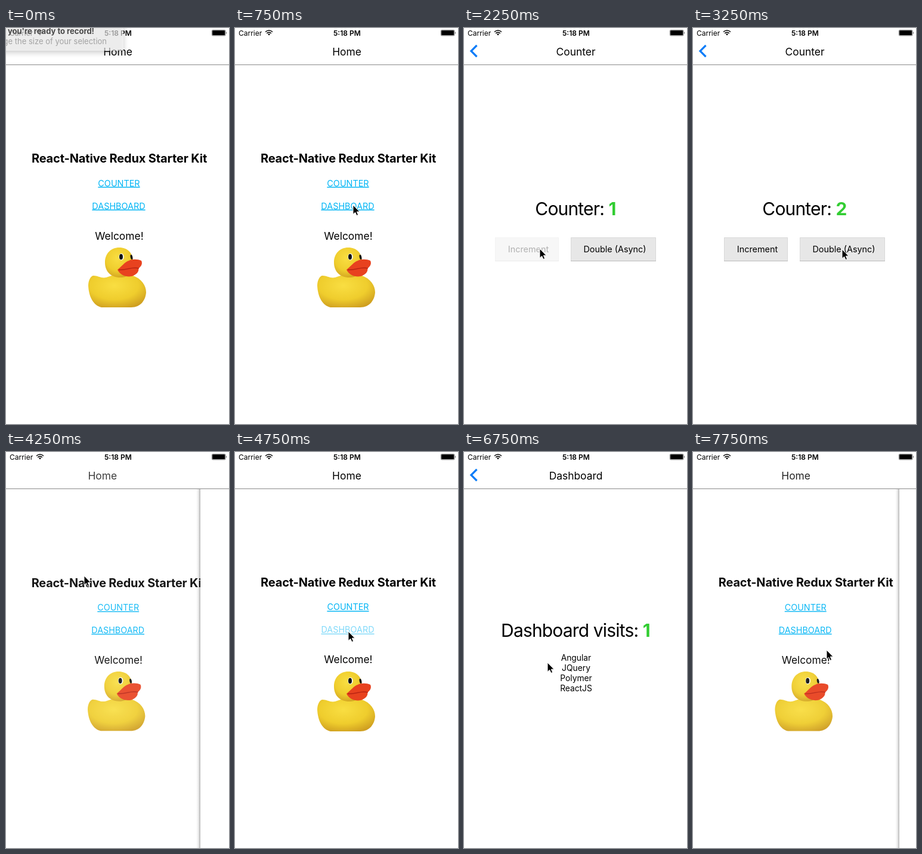
These frames come from a looping animation (374 by 662 pixels, 8 s). An HTML page:

```html
<!DOCTYPE html>
<html lang="en">
<head>
<meta charset="utf-8">
<title>Starter kit navigation</title>
<style>
  html, body { margin: 0; width: 100%; height: 100%; overflow: hidden; background: #fff; }
  svg { display: block; width: 100vw; height: 100vh; }
  text { font-family: Inter, "Liberation Sans", sans-serif; font-optical-sizing: none; text-anchor: middle; }
  .title { font-size: 17.4px; }
  .link { font-size: 14.4px; fill: #00b5f5; text-decoration: underline; }
  .big { font-size: 30px; letter-spacing: -.028em; }
  .big tspan { font-weight: 700; fill: #32cd32; }
  .button { font-size: 14.4px; }
  .list { font-size: 13.8px; }
  .status { font-size: 12px; text-anchor: start; }
</style>
</head>
<body>
<svg viewBox="0 0 374 662" preserveAspectRatio="none">
  <defs>
    <linearGradient id="edge">
      <stop offset="0" stop-opacity="0"/>
      <stop offset=".5" stop-opacity=".07"/>
      <stop offset="1" stop-opacity=".3"/>
    </linearGradient>
    <radialGradient id="yellow" cx=".45" cy=".35" r=".7">
      <stop offset="0" stop-color="#f9de42"/>
      <stop offset=".6" stop-color="#efcd2d"/>
      <stop offset="1" stop-color="#cf9f20"/>
    </radialGradient>
    <filter id="soft" x="-20%" y="-50%" width="140%" height="220%">
      <feDropShadow dx="0" dy="3" stdDeviation="5" flood-opacity=".35"/>
    </filter>
  </defs>

  <g id="home">
    <text x="190" y="225" font-size="20" font-weight="700" letter-spacing="-.15">React-Native Redux Starter Kit</text>
    <text id="counterLink" class="link" x="189.5" y="264.5">COUNTER</text>
    <text id="dashboardLink" class="link" x="189" y="302.5">DASHBOARD</text>
    <text x="190" y="353.5" font-size="17.4">Welcome!</text>
    <g id="duck">
      <path fill="url(#yellow)" d="M138 431C138 422 142 414 147 414C154 414 160 419 168 417L186 411L213 414C227 419 235 430 235 442C234 455 226 467 210 467H160C147 464 139 450 138 431Z"/>
      <path fill="url(#yellow)" d="M166 392C166 377 176 367 190 367C204 367 213 376 213 391C214 407 207 416 194 417C177 418 166 408 166 392Z"/>
      <ellipse cx="193.5" cy="382.5" rx="4.2" ry="5.8" fill="#fff"/>
      <ellipse cx="193" cy="382.5" rx="3" ry="4.7" fill="#111"/>
      <ellipse cx="210.5" cy="383" rx="1.8" ry="4" fill="#111" transform="rotate(-12 210.5 383)"/>
      <path fill="#e8421f" d="M187 404C194 399 199 391 206 389C211 386 221 386 227 389C229 393 228 398 222 402C224 407 218 413 211 415C199 417 190 411 187 404Z"/>
      <path fill="none" stroke="#b82413" stroke-width="1.4" d="M189 404C201 406 212 398 223 402"/>
    </g>
  </g>

  <g id="page">
    <rect x="-7" y="62" width="7" height="600" fill="url(#edge)"/>
    <rect y="62" width="374" height="600" fill="#fff"/>
    <g id="counterPage">
      <text class="big" x="187" y="313">Counter: <tspan id="count">0</tspan></text>
      <g id="increment">
        <rect x="52" y="350" width="107" height="39.5" fill="#e7e7e7"/>
        <path d="M52.5 389V350.5H158.5V389" fill="none" stroke="#d9d9d9"/>
        <path d="M52 389.5H159" stroke="#bbb"/>
        <text class="button" x="108" y="375">Increment</text>
      </g>
      <g id="double">
        <rect x="179" y="350" width="143" height="39.5" fill="#e7e7e7"/>
        <path d="M179.5 389V350.5H321.5V389" fill="none" stroke="#d9d9d9"/>
        <path d="M179 389.5H322" stroke="#bbb"/>
        <text class="button" x="253" y="375">Double (Async)</text>
      </g>
    </g>
    <g id="dashboardPage">
      <text class="big" x="187" y="309">Dashboard visits: <tspan>1</tspan></text>
      <g class="list">
        <text x="188" y="349">Angular</text>
        <text x="188" y="366">JQuery</text>
        <text x="188" y="383">Polymer</text>
        <text x="188" y="400">ReactJS</text>
      </g>
    </g>
  </g>

  <rect width="374" height="61" fill="#fff"/>
  <rect y="61" width="374" height="1" fill="#8a8a8a"/>
  <text id="homeTitle" class="title" x="187.5" y="45.5">Home</text>
  <text id="pageTitle" class="title" x="187.5" y="45.5"></text>
  <path id="back" d="M21.5 29L12 38.5L21.5 48" fill="none" stroke="#087cf8" stroke-width="3.2"/>

  <text class="status" x="6" y="12.5">Carrier</text>
  <g fill="none" stroke="#000" stroke-width="1.6">
    <path d="M51 6.5Q57 1.5 63 6.5M53.2 8.9Q57 5.7 60.8 8.9"/>
    <path d="M57 12.5L55 10.3Q57 8.8 59 10.3Z" fill="#000" stroke="none"/>
  </g>
  <text class="status" x="165" y="12.5" font-weight="600">5:18 PM</text>
  <rect x="345.4" y="3.5" width="22.7" height="9.4" rx="1.5" fill="none" stroke="#555" stroke-width=".8"/>
  <rect x="346.2" y="4.3" width="21" height="7.8" rx=".8"/>
  <path d="M369 6.2q1.5 2 0 4z"/>

  <g id="hint">
    <rect x="-60" y="-20" width="257" height="58" fill="#f0f0f0" fill-opacity=".6" filter="url(#soft)"/>
    <text x="148" y="10" font-size="13" font-weight="700" fill="#484848" style="text-anchor:end">you're ready to record!</text>
    <text x="169" y="27" font-size="13" fill="#a2a2a2" style="text-anchor:end">ge the size of your selection</text>
  </g>

  <path id="cursor" d="M0 0V15.5L3.6 12.2L6 17.5L8.6 16.4L6.3 11.2H11Z" stroke="#fff"/>
</svg>
<script>
const LOOP = 8000, STEP = 250, WIDTH = 374;
const $ = id => document.getElementById(id);

const navigation = [
  { at: 1483, page: "Counter", open: true },
  { at: 4047, page: "Counter", open: false },
  { at: 4886, page: "Dashboard", open: true },
  { at: 7508, page: "Dashboard", open: false }
];

// time, x, y
const pointer = [
  [750, 198, 296], [1000, 196, 294], [1250, 178, 268], [1500, 176, 264],
  [2000, 127, 369], [2500, 127, 369], [3000, 250, 370], [3250, 250, 370],
  [3750, 23, 44], [4000, 23, 44], [4250, 131, 207], [4500, 190, 300],
  [5500, 190, 300], [6250, 140, 352], [6750, 140, 352], [7250, 18, 40],
  [7500, 18, 40], [7750, 224, 331]
];

// critically damped spring
function settle(ms) {
  const k = ms * 0.0176;
  return 1 - (1 + k) * Math.exp(-k);
}

function pointerAt(t) {
  const next = pointer.findIndex(key => key[0] > t);
  if (next < 0) return pointer[pointer.length - 1].slice(1);
  if (next === 0) return null;
  const [t0, x0, y0] = pointer[next - 1], [t1, x1, y1] = pointer[next];
  const f = (t - t0) / (t1 - t0);
  return [x0 + (x1 - x0) * f, y0 + (y1 - y0) * f];
}

const show = (id, visible) => $(id).setAttribute("visibility", visible ? "inherit" : "hidden");
const fade = (id, opacity) => $(id).setAttribute("opacity", opacity);
const place = (id, transform) => $(id).setAttribute("transform", transform);

function draw(t) {
  const nav = navigation.filter(n => n.at <= t).pop() || { at: 0, page: "Counter", open: false };
  const moved = nav.at ? settle(t - nav.at) : 1;
  const p = nav.open ? moved : 1 - moved;

  place("home", `translate(${187 - 10 * p} 361) scale(${1 - 0.05 * p}) translate(-187 -361)`);
  fade("home", 1 - 0.7 * p);
  place("page", `translate(${WIDTH * (1 - p)} 0)`);
  show("page", p > 0.001);
  show("counterPage", nav.page === "Counter");
  show("dashboardPage", nav.page === "Dashboard");

  place("homeTitle", `translate(${-200 * p} 0)`);
  fade("homeTitle", (1 - p) ** 2);
  $("pageTitle").textContent = nav.page;
  place("pageTitle", `translate(${200 * (1 - p)} 0)`);
  fade("pageTitle", p ** 2);
  show("pageTitle", nav.open);
  show("back", nav.open);

  $("count").textContent = t < 2250 ? 0 : t < 3250 ? 1 : 2;
  fade("counterLink", t === 1500 ? 0.5 : 1);
  fade("dashboardLink", t === 4750 ? 0.5 : 1);
  fade("increment", t === 2250 ? 0.3 : 1);
  fade("double", t === 3000 ? 0.3 : 1);
  fade("hint", Math.max(0, 1 - t / 750));

  const at = pointerAt(t);
  show("cursor", at);
  if (at) place("cursor", `translate(${at})`);
}

function tick() {
  draw(Math.floor(performance.now() % LOOP / STEP) * STEP);
  requestAnimationFrame(tick);
}
tick();
</script>
</body>
</html>
```
